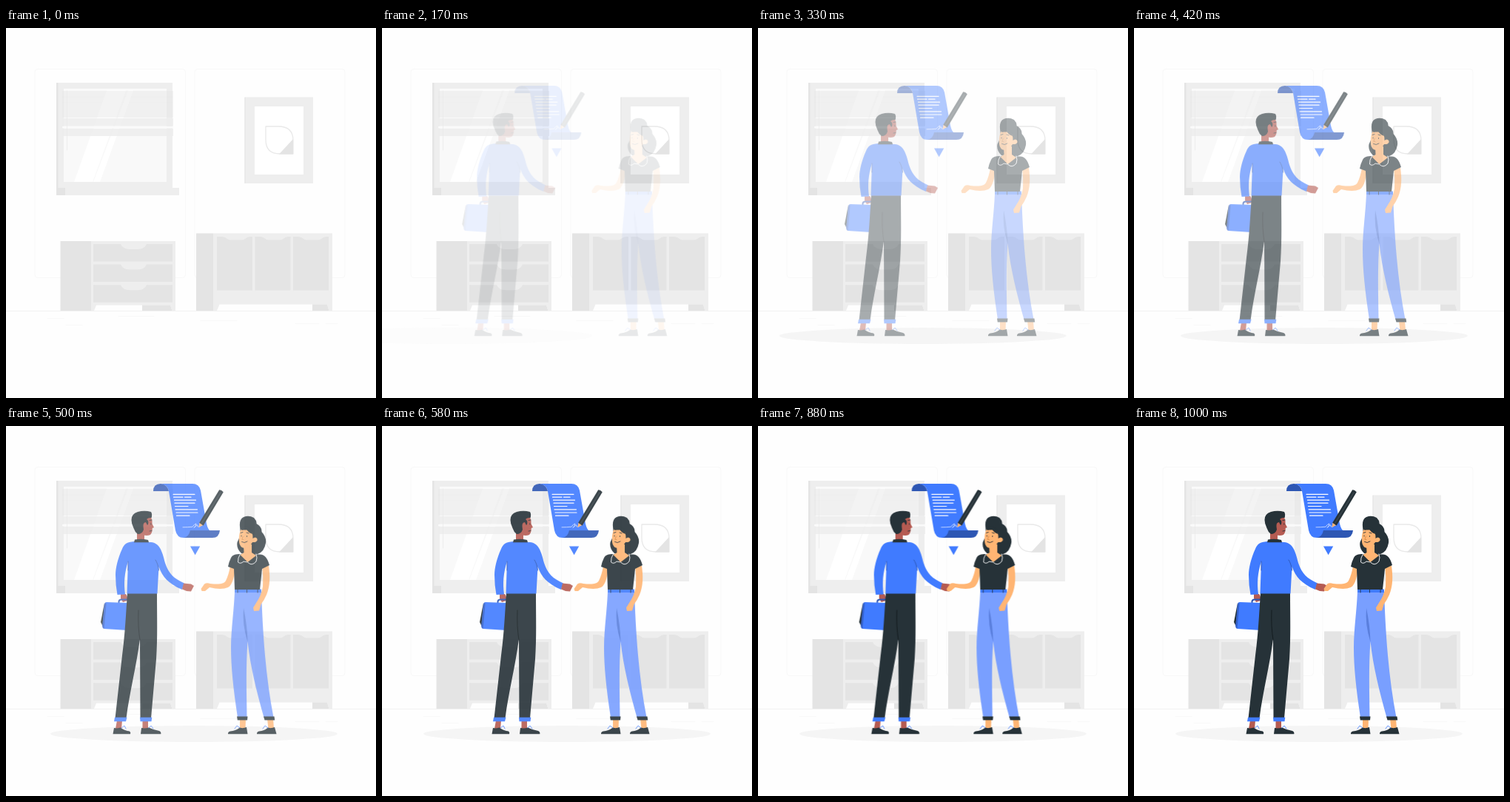
Write an HTML page that moves like this. It is 500 px wide and 500 px high and loops after 1.04 s.

```html
<!DOCTYPE html>
<html lang="en">
<head>
<meta charset="utf-8">
<title>Handshake</title>
<style>
  html, body { margin: 0; width: 100%; height: 100%; overflow: hidden; background: #fefefe; }
  svg { display: block; width: 100vw; height: 100vh; }

  .cast   { animation: appear 1040ms step-end infinite; }
  .slide  { animation: slide 1040ms cubic-bezier(.36, -.01, .5, 1.38) infinite; }
  .left   { --from: -30px; }
  .right  { --from: 30px; }
  .shadow { animation: sweep 1040ms linear infinite; }

  @keyframes appear { 0% { opacity: 0 } 12.5%, 100% { opacity: 1 } }
  @keyframes slide {
    0% { opacity: 0; transform: translateX(var(--from)) }
    94.2%, 100% { opacity: 1; transform: none }
  }
  @keyframes sweep {
    0%, 12.5% { opacity: 0; transform: translateX(-195px) }
    24% { opacity: .7; transform: translateX(-92px) }
    31.7% { opacity: .95; transform: translateX(-28px) }
    36% { opacity: 1; transform: translateX(-4px) }
    40.4% { opacity: 1; transform: translateX(7px) }
    48% { opacity: 1; transform: translateX(4px) }
    55.8%, 100% { opacity: 1; transform: none }
  }

  .blue { fill: #407bff } .navy { fill: #2d56b3 } .dark { fill: #263238 }
  .tan { fill: #ffb573 } .brown { fill: #b55b52 }
  .g1 { fill: #e4e4e4 } .g2 { fill: #eee } .g3 { fill: #f5f5f5 } .white { fill: #fff }
  .line { fill: none; stroke-linecap: round; stroke-linejoin: round }
</style>
</head>
<body>
<svg viewBox="0 0 500 500">
  <defs>
    <path id="drawer" d="M0 0H37Q40 7 49 7H60Q69 7 72 0H107V23.5H0Z"/>
    <path id="door" d="M0 0H6Q11 0 14 3Q16 4.500 19 4.500H33Q36 4.500 38 3Q41 0 45 0H48V72.500H0Z"/>
  </defs>

  <!-- Room -->
  <g class="line" stroke="#f8f8f8">
    <rect x="39" y="55.500" width="203.500" height="282" rx="4"/>
    <rect x="255" y="55.500" width="203" height="282" rx="4"/>
    <path stroke="#f2f2f2" d="M0 382.500H500"/>
    <path d="M56 392.500H78M81 401.500H103M152 389.500H200M263 395.500H312M391 399.500H423M432 399.500H448"/>
  </g>

  <!-- Window -->
  <rect class="g2" x="68" y="74" width="157" height="152"/>
  <path class="g1" d="M68 74H70.500V216H80V226H68Z"/>
  <rect class="g2" x="80" y="216" width="154" height="10"/>
  <rect x="78" y="82" width="139" height="126" fill="#f9f9f9"/>
  <path class="white" d="M137 82H163L117 208H92ZM166 82H173L127 208H118Z"/>
  <g fill="#e6e6e6" opacity=".45">
    <rect x="76" y="85" width="150" height="36"/>
    <rect x="76" y="92.500" width="150" height="1"/>
    <rect x="76" y="100.500" width="150" height="1.500"/>
  </g>
  <path fill="#eee" opacity=".85" d="M76 122H226V132.500H76ZM76 136H226V146H76Z"/>
  <path fill="#fafafa" d="M78 82H217V84.500H78ZM76 133H226V135.500H76Z"/>
  <path class="line" stroke="#e8e8e8" stroke-width=".7" d="M82.500 85V165"/>

  <!-- Picture -->
  <path class="g2" d="M322.500 93.500H415V210H322.500Z"/>
  <path class="line" stroke="#e4e4e4" d="M323 94V209.500"/>
  <path class="white" d="M336 106H402V198H336Z"/>
  <path class="line" stroke="#e9e9e9" stroke-width="1.300" d="M351 133H368Q388 133 388 152V170H370Q351 170 351 151Z"/>
  <path class="g1" d="M388 150V170.500H369Z"/>

  <!-- Cabinets -->
  <path class="g2" d="M115 288H229V382H224.500L222 374.500H122L119 382H115Z"/>
  <path class="g1" d="M73.500 288H115V382H73.500ZM184 374.500H222L224.500 382H184Z"/>
  <g class="g1">
    <use href="#drawer" x="118" y="292"/>
    <use href="#drawer" x="118" y="319.500"/>
    <use href="#drawer" x="118" y="347.300"/>
  </g>
  <path class="g2" d="M280 277.500H441V382H436.500L434 373.500H288.500L285 382H280Z"/>
  <path class="g1" d="M257 277.500H280V382H257ZM414 373.500H434L436.500 382H414Z"/>
  <g class="g1">
    <use href="#door" x="285" y="282"/>
    <use href="#door" x="336.500" y="282"/>
    <use href="#door" x="388" y="282"/>
  </g>

  <ellipse class="shadow g3" cx="250" cy="416" rx="194" ry="11"/>

  <g class="cast">
    <g class="slide left">
      <!-- Contract -->
      <path class="blue" d="M214 78H259Q268 78 270 87L278 132Q280 141 284 142L256 151H247Q238 151 236 141L227 88Q225 78 214 78Z"/>
      <path class="navy" d="M206 88Q206 78 216 78Q225 79 227 88Z"/>
      <path class="navy" d="M256 141H296Q295 151 286 151H247Q254 150 256 141Z"/>
      <path class="line" stroke="#fff" stroke-width="1.200" d="M233 92.300H262M233.500 96.200H246M248.500 96.200H257M234.500 100.200H263.500M235 104.200H262M235.500 108.500H253M236 112.800H265.500M237 117H266M237.500 121.200H255"/>
      <path class="line" stroke="#dce6ff" stroke-width=".8" d="M246 136.800Q253 136.800 259 136.200Q262 132 264 132Q264 135 261 137.500Q265 133 266 134Q265 137 269 136"/>
      <path class="tan" d="M268.500 130.500L273.500 134L267.500 136.800Z"/>
      <path class="dark" d="M295.200 86.300Q298 86 300.800 89.300L273.700 134.500L268.200 130.800Z"/>
      <path class="line" stroke="#515b60" stroke-width=".7" d="M297 90L271.500 131.500"/>
      <path class="blue" d="M256 162.500H269.200L262.600 174.200Z"/>

      <!-- Man -->
      <path class="brown" d="M162 227L169 227Q172 231 171 236L165 238L162 233Z"/>
      <path class="line" stroke="#2d56b3" stroke-width="2" d="M159.500 239V237Q160 234.500 163 234.500H171"/>
      <path class="dark" d="M140 239L135 265L139 273Z"/>
      <path class="blue" d="M143 238L171 239V276L140 274Q137 273.500 137.300 270L140 241Q140.500 238 143 238Z"/>
      <path class="navy" opacity=".7" d="M141.500 238.500Q140 239 139.900 242L137.300 270Q137.300 273 139.500 274L142.500 240Z"/>
      <path class="brown" d="M157 398H164L163 409H155ZM191.500 398H199L199 409H191.500Z"/>
      <path class="dark" d="M153 408Q157 409 161.500 407.500Q168 412 174 412.500Q176 414 175 416.300H151.500ZM190 408Q195 409 200 407.500Q207 411 214 412Q217 413.500 216.300 416.300H189Z"/>
      <path class="line" stroke="#407bff" stroke-width=".8" d="M163 408L167 405L169 409M200 408L203 405L206 409"/>
      <path class="dark" d="M171 225H211C211 260 212 285 210 315L203 395H188.500L188 288C183 325 174 360 169.500 395H154.500L164 310C168 280 169 255 171 225Z"/>
      <path class="line" stroke="#121a1e" stroke-width=".9" d="M188 289Q185 270 186 249"/>
      <path class="blue" d="M154 393.700H170.500L169 399.300H153ZM188 393.700H204.300L203.500 399.300H188.500Z"/>
      <path class="blue" d="M180 156C170 157 167 159 164 166C158 179 155 192 155 201Q155 215 157.500 228L168 227.500C166 212 167 199 172 183L170.500 226.500H211.500L213.500 190C218 203 226 213 245 221L248 212.500C234 206 227 200 222 185C218 168 214 158 203 157Z"/>
      <path class="line" stroke="#2d56b3" stroke-width=".9" d="M172 183V195M213.500 195Q212.500 186 209 181"/>
      <path class="brown" d="M247 212.500L257 213.500L261 216L257 223.500L251 223L245 220.500Z"/>
      <path class="brown" d="M184 141H194V155Q189 157 184 155Z"/>
      <path class="dark" d="M181 153.500Q190 152 199 154L200 157.300H180Z"/>
      <path class="brown" d="M190 127Q194 121 203 123Q205 128 204.500 132L207 137L204.700 138Q205 144 202 147Q197 149 192 147Z"/>
      <path class="dark" d="M176.500 127Q176 119 185 116Q194 113.500 203 116Q205 119 203.500 124Q199 123.500 197 126L199 128Q200 132 198 134L196 130Q192 130 192.500 136L193 140Q191 146 185 146Q181 143 179.500 138Q176.500 132 176.500 127Z"/>
      <path class="line" stroke="#263238" stroke-width=".9" d="M201 127.500L204 127M202.800 131.800V133M201 142L203.800 141.500"/>
    </g>

    <g class="slide right">
      <!-- Woman -->
      <path class="tan" d="M309 396H317L316.500 409H309ZM346 396H354L355 409H347.500Z"/>
      <path class="dark" d="M309 407.500Q313 409 318 407L319.500 416.300H293Q292.500 413.500 296 412.500Q303 412 309 407.500ZM347 407.500Q351 409 356 407L358.500 416.300H332Q331.500 413.500 335 412.500Q342 412 347 407.500Z"/>
      <path class="line" stroke="#407bff" stroke-width=".8" d="M309 408L305 405L302 409M347 408L343 405L340 409"/>
      <path fill="#799fff" d="M302 224H338C339 250 340 275 343 310Q347 355 354.500 394H341.500C332 360 323 325 319.500 291C317 325 318 360 318.500 394H306C300 355 297 325 297 300C297 275 301 250 302 224Z"/>
      <path fill="#5a7fdd" d="M314 246Q312 268 319.500 292Q319 270 314 246Z"/>
      <path class="dark" d="M305 392.500H319.500L319 397.500H305.800ZM341 392.500H355.500L356.200 397.500H342.500Z"/>
      <path class="blue" d="M302 220.500H338V225H302Z"/>
      <path class="line" stroke="#263238" stroke-width=".9" stroke-linecap="butt" d="M306 220.500V225M318.500 220.500V225M333 220.500V225"/>
      <path class="tan" d="M296 189H304C301 202 300 214 293 218Q284 222 268 218L262 223H257.500L256.500 220L261 213.500Q264 211.500 269 213C280 214 287 214 290 209Q294 201 296 189Z"/>
      <path class="tan" d="M339 189H348C350 203 350 216 345 228Q342 235 337.500 241L335 249.500L328 250L327 245.500L331 239Q338 229 340 217Q341 203 339 189Z"/>
      <path class="dark" d="M310 173C303 173 299 174 297 178Q294 184 293 190L301 193L302 221H336L339 193L349 188C346 178 343 174 336 173.500Z"/>
      <path class="dark" d="M309 136Q308 126 314 123Q321 120 328 124Q332 128 331.500 132Q339 136 338.500 143Q345 150 344 158Q342 170 333 173Q322 176 311 172Q304 166 305.500 157L310 147Z"/>
      <path class="tan" d="M314 160H325V171L331 175L319.500 184L309.500 174L314.500 171Z"/>
      <path class="tan" d="M310.500 139Q307 147 308 157Q309 164 315 165Q322 164 326 157Q331 157.500 332.500 154.500Q333 151 329.500 150.500Q327 151 326.500 152Q327 144 322 139Q316 142 310.500 139Z"/>
      <path class="dark" d="M310 140Q312 135 318 135Q326 138 326 146Q319 143 317 138Q314 142 310 140Z"/>
      <path class="line" stroke="#263238" stroke-width=".9" d="M310 144.500L313 143.500M318 144L321 145M311 148V149M318.500 148.500V149.500M311.500 156.500Q315 159 319 156"/>
      <path class="line" stroke="#d58745" stroke-width=".8" d="M313.500 149L311.800 153.300L314 153.500"/>
      <path class="line" stroke="#fff" stroke-width=".9" d="M309.500 173Q306 178 306.500 184Q310 187 314 183L319.500 184Q325 190 331 183Q333 178 331 173"/>
    </g>
  </g>
</svg>
</body>
</html>
```
